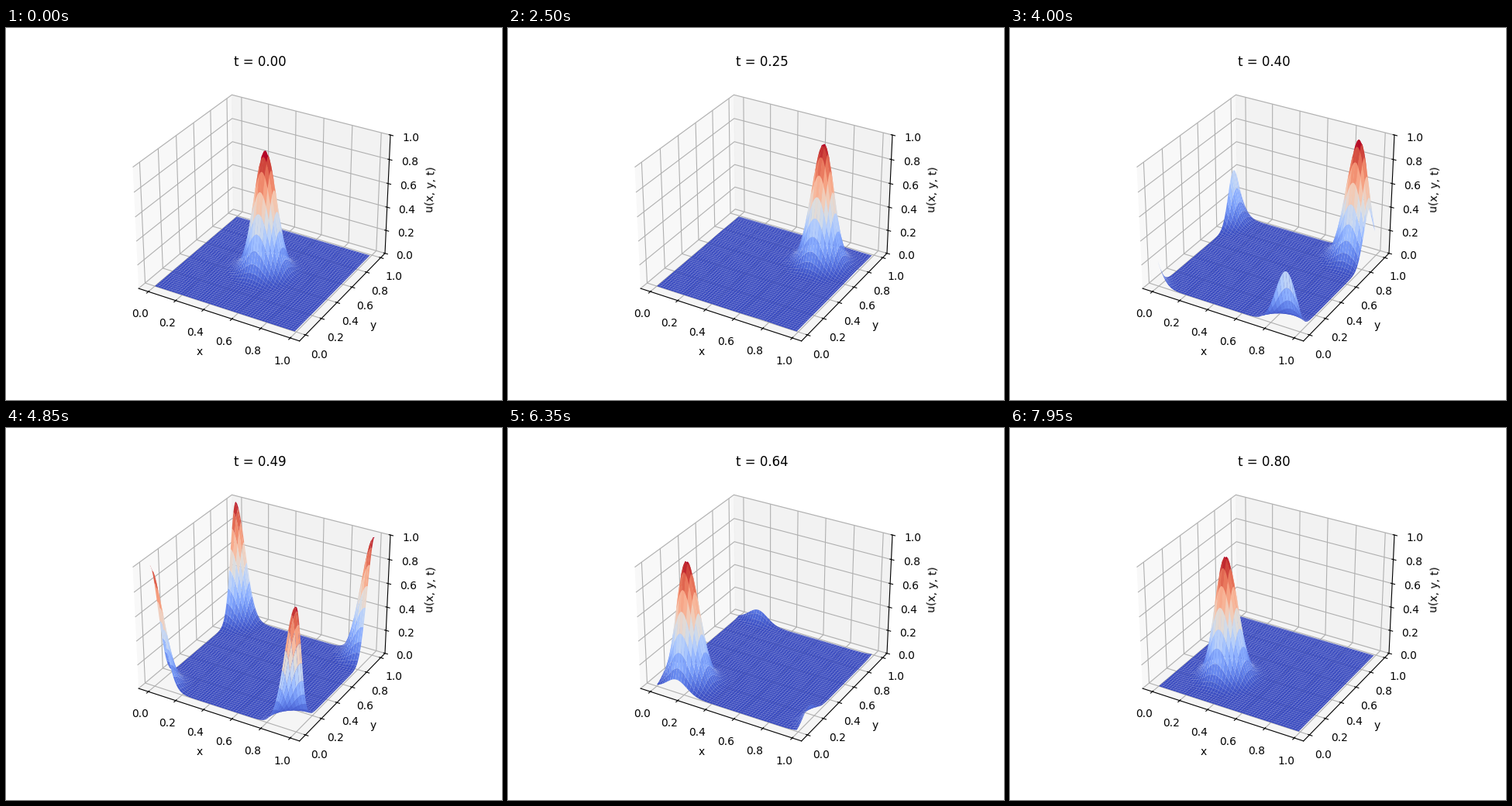
These frames come from a looping animation (640 px wide and 480 px high, 8 s). A matplotlib script:

```python
import numpy as np
import matplotlib.pyplot as plt
from matplotlib.animation import FuncAnimation

N = 100
STRIDE = 2
STEPS = 200
FRAMES = 160
SHARPNESS = 100

times = np.linspace(0, 1, STEPS)
x = np.linspace(0, 1, N, endpoint=False)
X, Y = np.meshgrid(x, x)
PERIOD = x[-1]


def profile(t):
    """One axis of the pulse, wrapped to the nearest periodic copy."""
    d = x - 0.5 - t
    d -= PERIOD * np.round(d / PERIOD)
    return np.exp(-SHARPNESS * d**2)


def wave(t):
    p = profile(t)
    return np.outer(p, p)


def perimeter(r0, r1, c0, c1):
    """Flat indices around the edge of one block of grid cells."""
    top = [r0 * N + c for c in range(c0, c1)]
    right = [r * N + c1 for r in range(r0, r1)]
    bottom = [r1 * N + c for c in range(c1, c0, -1)]
    left = [r * N + c0 for r in range(r1, r0, -1)]
    return top + right + bottom + left


cuts = [*range(0, N - 1, STRIDE), N - 1]
spans = list(zip(cuts, cuts[1:]))
faces = [np.array(perimeter(*rows, *cols)) for rows in spans for cols in spans]

fig = plt.figure(figsize=(6.4, 4.8), dpi=100)
ax = fig.add_subplot(projection="3d")
surf = ax.plot_surface(X, Y, wave(0), cmap="coolwarm",
                       rstride=STRIDE, cstride=STRIDE)
ax.set_zlim(0, 1)
ax.set_xlabel("x")
ax.set_ylabel("y")
ax.set_zlabel("u(x, y, t)")
title = ax.set_title("t = 0.00")


def update(i):
    points = np.column_stack([X.ravel(), Y.ravel(), wave(times[i]).ravel()])
    polys = [points[face] for face in faces]
    heights = np.array([poly[:, 2].mean() for poly in polys])
    surf.set_verts(polys)
    surf.set_array(heights)
    surf.set_clim(heights.min(), heights.max())
    title.set_text(f"t = {times[i]:.2f}")
    return surf, title


anim = FuncAnimation(fig, update, frames=FRAMES, interval=50, repeat=True)
plt.show()
```
